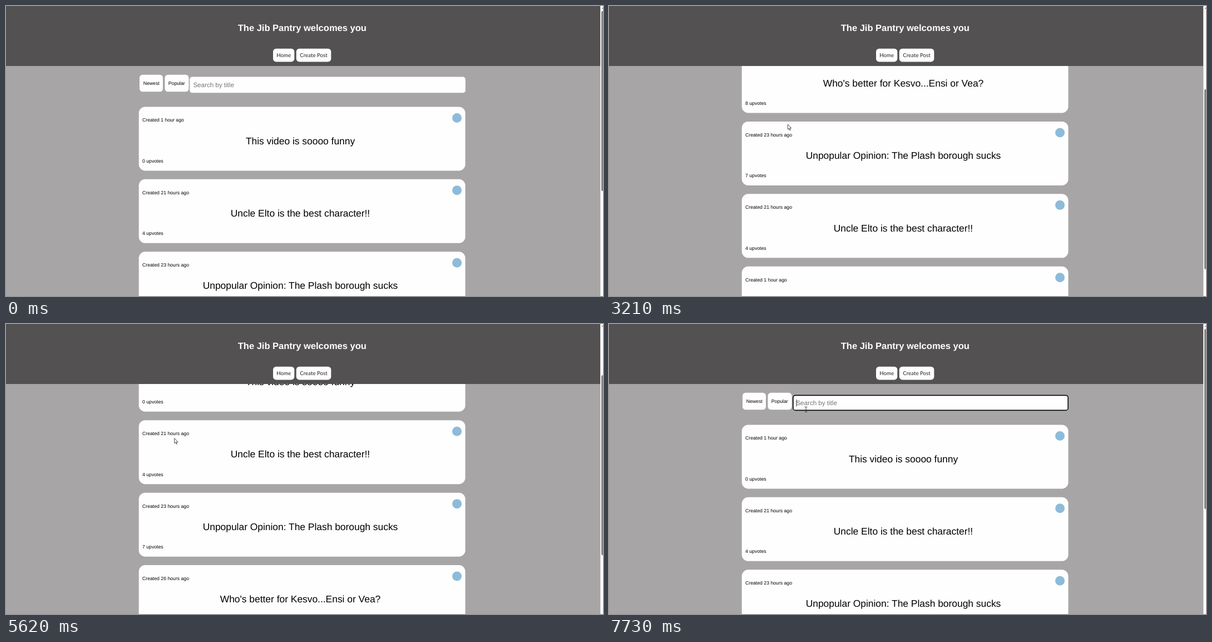
An HTML page that plays this animation: 1073x522 px, repeating every 8000 ms.

```html
<!DOCTYPE html>
<html lang="en">
<head>
<meta charset="utf-8">
<title>Forum feed</title>
<style>
  html, body { margin: 0; width: 100%; height: 100%; overflow: hidden; background: #a7a5a5; }
  svg { display: block; width: 100%; height: 100%; }
  text { font: 8.7px "Liberation Sans", Arial, sans-serif; text-rendering: geometricPrecision; }
  .title { font-size: 17.4px; text-anchor: middle; }
  .heading { font-size: 16.5px; font-weight: bold; fill: #fff; text-anchor: middle; }
  .nav { font: 9.7px Lato, sans-serif; fill: #222; text-anchor: middle; }
  .hint { font-size: 11.6px; fill: #757575; }
  .box { fill: #fefefe; }
</style>
</head>
<body>
<svg viewBox="0 0 1073 522">
  <rect width="1073" height="522" fill="#a7a5a5"/>
  <g id="page">
    <rect class="box" x="240" y="123.7" width="42" height="30.6" rx="5.5"/>
    <text x="246.7" y="142.3">Newest</text>
    <rect class="box" x="285.5" y="123.7" width="43" height="30.6" rx="5.5"/>
    <text x="291.8" y="142.3">Popular</text>
    <rect class="box" x="330.2" y="127.6" width="495.6" height="28.6" rx="4.5"/>
    <text class="hint" x="336.4" y="145.9">Search by title</text>
    <g id="focus" fill="none" stroke="#000">
      <rect x="330.9" y="128.4" width="494.2" height="27" rx="4" stroke-width="1.6"/>
      <path d="M337 136V148.5" stroke-width=".8"/>
    </g>
    <g id="cards"></g>
  </g>
  <rect width="1068" height="108" fill="#535151"/>
  <text class="heading" x="532.3" y="44.8">The Jib Pantry welcomes you</text>
  <rect class="box" x="480" y="76.7" width="38.3" height="23.7" rx="5.5"/>
  <text class="nav" x="499.2" y="92">Home</text>
  <rect class="box" x="521.7" y="76.7" width="62.6" height="23.7" rx="5.5"/>
  <text class="nav" x="553" y="92">Create Post</text>
  <rect x="1068.3" width="5" height="522" fill="#fcfcfc"/>
  <path d="M1070.5 5L1073 2.5V5Z" fill="#858585"/>
  <rect id="thumb" x="1070" width="6" height="324" rx="2.5" fill="#858585"/>
  <path id="arrow" d="M.4 .6V9.6L2.4 7.8 3.9 11.2 5.3 10.6 3.8 7.3H6.6Z" fill="#fff" stroke="#222" stroke-width=".8"/>
  <path id="beam" d="M-2.4 -4.5H-.6L0 -4 .6 -4.5H2.4M0 -4V4M-2.4 4.5H-.6L0 4 .6 4.5H2.4" fill="none" stroke="#333" stroke-width=".9"/>
</svg>
<script>
// All times below are counted in screen refreshes.
const LOOP = 8000, REFRESH = LOOP / 60, LEAD = 32;
const MAX_SCROLL = 330.7;
const SORT_POPULAR = 16, SORT_NEWEST = 36, FOCUS = 58;

const byId = id => document.getElementById(id);
const progress = (t, from, to) => Math.min(1, Math.max(0, (t - from) / (to - from)));
const easeOut = p => 1 - (1 - p) ** 3;
const easeInOut = p => p * p * (3 - 2 * p);

const posts = [
  ["1 hour", "This video is soooo funny", 0],
  ["21 hours", "Uncle Elto is the best character!!", 4],
  ["23 hours", "Unpopular Opinion: The Plash borough sucks", 7],
  ["26 hours", "Who's better for Kesvo...Ensi or Vea?", 8],
  ["26 hours", "Saddest episode EVER!", 10]
];

const cards = posts.map(([age, title, votes]) => {
  const card = document.createElementNS("http://www.w3.org/2000/svg", "g");
  card.innerHTML = `
    <rect class="box" x="238.7" width="586.8" height="115" rx="11.5"/>
    <text x="245" y="27.1">Created ${age} ago</text>
    <circle cx="810.5" cy="20" r="8.5" fill="#8dbbd9"/>
    <text class="title" x="529" y="67.2">${title}</text>
    <text x="245" y="100.4">${votes} upvotes</text>`;
  byId("cards").append(card);
  return card;
});

const moves = [
  { from: 2, to: 5, x: 521, y: 189 },
  { from: 5, to: 12, x: 354, y: 151 },
  { from: 12, to: 15, x: 313, y: 137 },
  { from: 17, to: 20, x: 321, y: 212.5 },
  { from: 31, to: 35, x: 271.5, y: 152 },
  { from: 36, to: 41, x: 302.3, y: 205 },
  { from: 53, to: 58, x: 354, y: 153.7 }
];

function cursorAt(t) {
  let x = 907, y = 492;
  for (const move of moves) {
    const part = easeOut(progress(t, move.from, move.to));
    x += (move.x - x) * part;
    y += (move.y - y) * part;
  }
  return { x, y };
}

// A trip glides to the bottom of the page and later returns to the top.
function scrollTrip(t, down, up) {
  return MAX_SCROLL * (easeOut(progress(t, down, down + 7)) - easeInOut(progress(t, up, up + 4.5)));
}

const place = (node, x, y) => node.setAttribute("transform", `translate(${x} ${y})`);
const show = (node, visible) => node.setAttribute("visibility", visible ? "visible" : "hidden");

function draw() {
  const t = Math.floor((performance.now() % LOOP + LEAD) / REFRESH) % 60;
  const scroll = scrollTrip(t, 21.64, 29.4) + scrollTrip(t, 40.84, 48.5);
  const { x, y } = cursorAt(t);
  const popular = t >= SORT_POPULAR && t < SORT_NEWEST;
  const overSearch = scroll < 1 && x > 330 && x < 826 && y > 128 && y < 156;

  cards.forEach((card, i) => place(card, 0, 181.4 + 130.45 * (popular ? 4 - i : i)));
  place(byId("page"), 0, -scroll);
  place(byId("thumb"), 0, 9 + scroll * 0.6);
  place(byId("arrow"), x, y);
  place(byId("beam"), x, y);
  show(byId("arrow"), t >= 2 && !overSearch);
  show(byId("beam"), t >= 2 && overSearch);
  show(byId("focus"), t >= FOCUS);
  requestAnimationFrame(draw);
}
draw();
</script>
</body>
</html>
```
